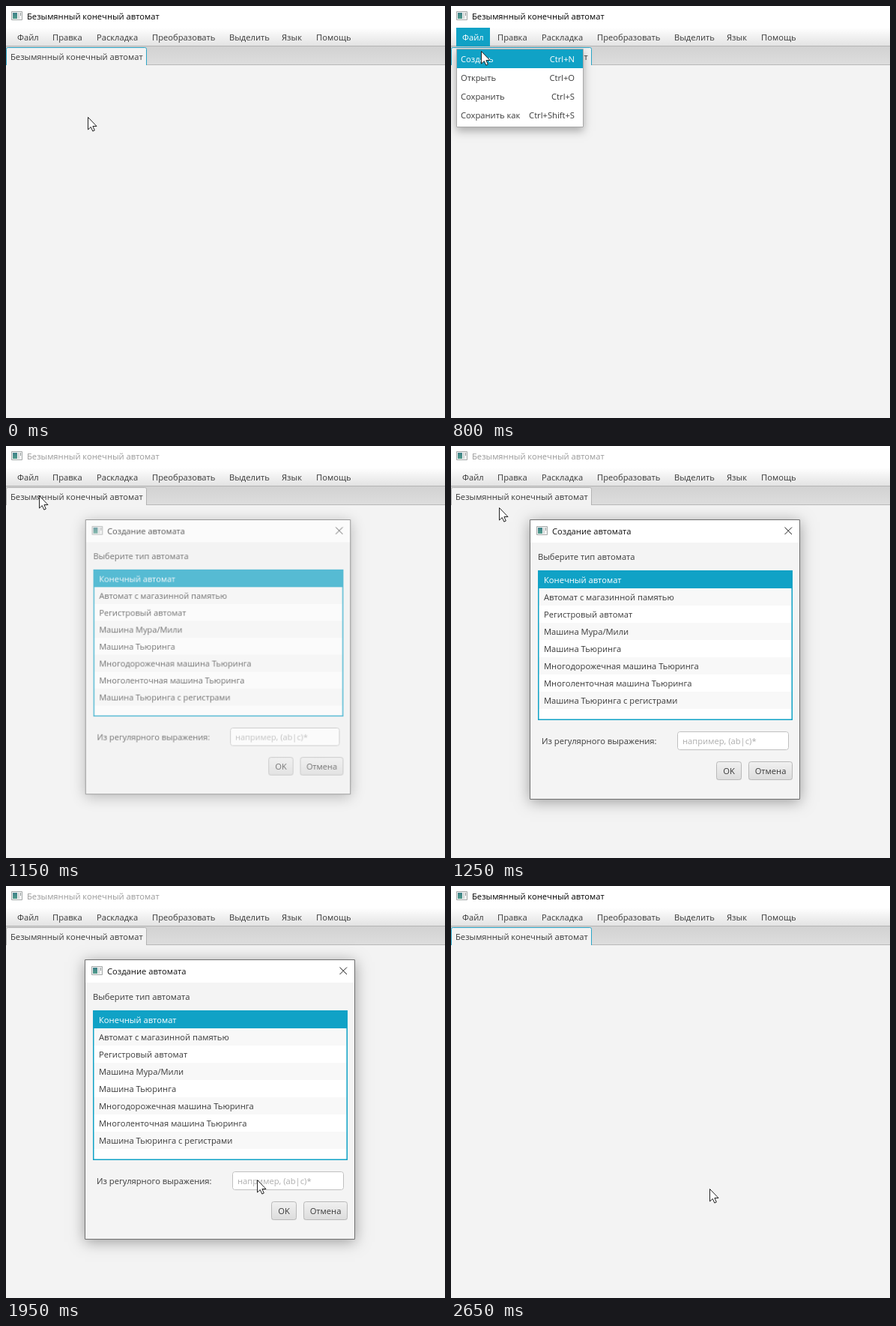
These frames come from a looping animation (586x550 px, 2700 ms). An HTML page with a canvas:

```html
<!DOCTYPE html>
<html lang="ru">
<head>
<meta charset="utf-8">
<style>
  html, body { margin: 0; width: 100%; height: 100%; overflow: hidden; background: #f3f3f3; }
  canvas { display: block; width: 586px; height: 550px; }
</style>
</head>
<body>
<canvas id="stage" width="586" height="550"></canvas>
<script>
const W = 586, H = 550, LOOP = 2700, STEP = 50;
const BLUE = '#10a2c6', INK = '#3a3a3a';
const TITLE = 'Безымянный конечный автомат';

const stage = document.getElementById('stage').getContext('2d');
const layer = document.createElement('canvas');
layer.width = W;
layer.height = H;
const dialog = layer.getContext('2d');

// Moments at which the interface switches state
const MENU_OPEN = 550, MENU_CLOSE = 1000, DIALOG_OPEN = 1100, OK_PRESS = 2250, DIALOG_CLOSE = 2350;

// Pointer stops: time, x, y
const path = [
  [0, 109, 148], [500, 31, 44], [550, 31, 44], [800, 40, 60], [1150, 44, 66],
  [1550, 205, 202], [2150, 361, 437], [2300, 361, 437], [2650, 345, 404], [2700, 345, 404]
];

const menus = [['Файл', 15], ['Правка', 62], ['Раскладка', 121], ['Преобразовать', 195],
  ['Выделить', 298], ['Язык', 368], ['Помощь', 414]];
const commands = [['Создать', 'Ctrl+N'], ['Открыть', 'Ctrl+O'],
  ['Сохранить', 'Ctrl+S'], ['Сохранить как', 'Ctrl+Shift+S']];
const machines = ['Конечный автомат', 'Автомат с магазинной памятью', 'Регистровый автомат',
  'Машина Мура/Мили', 'Машина Тьюринга', 'Многодорожечная машина Тьюринга',
  'Многоленточная машина Тьюринга', 'Машина Тьюринга с регистрами'];

function rect(c, x, y, w, h, fill) {
  c.fillStyle = fill;
  c.fillRect(x, y, w, h);
}

function frame(c, x, y, w, h, color, radius = 0, line = 1) {
  c.beginPath();
  c.roundRect(x + line / 2, y + line / 2, w - line, h - line, radius);
  c.strokeStyle = color;
  c.lineWidth = line;
  c.stroke();
}

function text(c, str, x, middle, color = INK, align = 'left') {
  c.font = '11.2px "Open Sans", "Noto Sans", sans-serif';
  c.textAlign = align;
  c.fillStyle = color;
  c.fillText(str, x, middle + 4);
}

function gradient(c, y, h, from, to) {
  const g = c.createLinearGradient(0, y, 0, y + h);
  g.addColorStop(0, from);
  g.addColorStop(1, to);
  return g;
}

function shadowed(c, x, y, w, h, fill, blur, dy, alpha) {
  c.save();
  c.shadowColor = `rgba(0,0,0,${alpha})`;
  c.shadowBlur = blur;
  c.shadowOffsetY = dy;
  rect(c, x, y, w, h, fill);
  c.restore();
}

function windowIcon(c, x, y) {
  rect(c, x, y, 15, 12, '#f4f4f4');
  frame(c, x, y, 15, 12, '#a4a9a9');
  rect(c, x + 2, y + 2, 6, 8, gradient(c, y + 2, 8, '#3d7f88', '#529d8c'));
  rect(c, x + 9, y + 2, 2, 8, '#d2d6d6');
  rect(c, x + 12, y + 2, 1, 4, '#8d9696');
}

// Monotone cubic interpolation along one axis of the pointer path
function pointerAxis(t, axis) {
  const slope = i => (path[i + 1][axis] - path[i][axis]) / (path[i + 1][0] - path[i][0]);
  const tangent = i => {
    if (i === 0 || i === path.length - 1) return 0;
    const a = slope(i - 1), b = slope(i);
    return a * b > 0 ? 2 * a * b / (a + b) : 0;
  };
  let i = 0;
  while (i < path.length - 2 && t >= path[i + 1][0]) i++;
  const span = path[i + 1][0] - path[i][0];
  const u = (t - path[i][0]) / span, v = 1 - u;
  return path[i][axis] * (1 + 2 * u) * v * v + path[i + 1][axis] * u * u * (3 - 2 * u)
    + span * u * v * (tangent(i) * v - tangent(i + 1) * u);
}

function drawPointer(x, y) {
  const c = stage;
  c.beginPath();
  [[0, 0], [0, 16.5], [3.8, 13], [6.3, 18.6], [8.8, 17.5], [6.4, 12], [11.5, 12]]
    .forEach(([dx, dy]) => c.lineTo(x + dx + 0.5, y + dy + 0.5));
  c.closePath();
  c.fillStyle = '#fff';
  c.fill();
  c.strokeStyle = '#222';
  c.lineWidth = 1;
  c.stroke();
}

function drawWindow(active, fileLit) {
  const c = stage;
  rect(c, 0, 0, W, H, '#f3f3f3');
  rect(c, 0, 0, W, 29, '#fff');
  windowIcon(c, 7, 7);
  text(c, TITLE, 28, 14, active ? '#000' : '#999');

  rect(c, 0, 54, W, 24, gradient(c, 54, 24, '#d2d2d2', '#dddddd'));
  rect(c, 0, 78, W, 1, '#b8b8b8');
  rect(c, 0, 29, W, 24, gradient(c, 29, 24, '#ffffff', '#e3e3e3'));
  rect(c, 0, 53, W, 1, '#b4b4b4');
  if (fileLit) rect(c, 7, 29, 45, 25, BLUE);
  menus.forEach(([name, x], i) => text(c, name, x, 42, fileLit && i === 0 ? '#fff' : INK));

  c.beginPath();
  c.roundRect(0.5, 55.5, 187, 26, [2, 2, 0, 0]);
  c.save();
  c.clip();
  rect(c, 0, 55, 188, 24, '#f3f3f3');
  c.restore();
  c.save();
  c.beginPath();
  c.rect(0, 54, 190, 25);
  c.clip();
  frame(c, 0, 55, 188, 28, active ? '#2ba6c8' : '#b4b4b4', 2);
  c.restore();
  text(c, TITLE, 6, 68);
}

function drawMenu(y) {
  const c = stage;
  shadowed(c, 7, 57, 170, 105, '#fff', 11, 5, 0.3);
  frame(c, 7, 57, 170, 105, '#a9a9a9');
  commands.forEach(([name, keys], i) => {
    const top = 58 + 25 * i, lit = y >= top && y < top + 25;
    if (lit) rect(c, 8, top, 168, 25, BLUE);
    const color = lit ? '#fff' : INK;
    text(c, name, 13, top + 13, color);
    text(c, keys, 165, top + 13, color, 'right');
  });
}

function button(c, label, x, w, from, to, border, line) {
  c.beginPath();
  c.roundRect(x, 421, w, 25, 3);
  c.fillStyle = gradient(c, 421, 25, from, to);
  c.fill();
  frame(c, x, 421, w, 25, border, 3, line);
  text(c, label, x + w / 2, 434, INK, 'center');
}

function drawDialog(pressed, hovered) {
  const c = dialog;
  c.clearRect(0, 0, W, H);
  shadowed(c, 105, 98, 361, 374, '#f4f4f4', 18, 3, 0.36);
  rect(c, 106, 99, 359, 30, '#fff');
  frame(c, 105, 98, 361, 374, '#707070');
  windowIcon(c, 114, 107);
  text(c, 'Создание автомата', 135, 114, '#111');
  c.beginPath();
  c.moveTo(445.5, 108.5);
  c.lineTo(455, 118);
  c.moveTo(455, 108.5);
  c.lineTo(445.5, 118);
  c.strokeStyle = '#222';
  c.lineWidth = 1;
  c.stroke();
  text(c, 'Выберите тип автомата', 116, 148);

  rect(c, 116, 166, 340, 200, '#fff');
  machines.forEach((name, i) => {
    const top = 167 + 23 * i, selected = i === 0;
    const plain = i % 2 ? '#f8f8f8' : '#fff';
    rect(c, 117, top, 338, 23, selected ? (pressed ? '#d0d0d0' : BLUE) : plain);
    text(c, name, 124, top + 12, selected && !pressed ? '#fff' : INK);
  });
  frame(c, 116, 166, 340, 200, pressed ? '#c4c4c4' : BLUE, 0, pressed ? 1 : 1.5);

  text(c, 'Из регулярного выражения:', 121, 394);
  c.beginPath();
  c.roundRect(302, 381, 149, 25, 3);
  c.fillStyle = '#fff';
  c.fill();
  frame(c, 302, 381, 149, 25, '#c0c0c0', 3);
  text(c, 'например, (ab|c)*', 309, 394, '#adadad');

  if (pressed) button(c, 'OK', 354, 34, '#dedede', '#d0d0d0', '#26a7cb', 1.6);
  else if (hovered) button(c, 'OK', 354, 34, '#fbfbfb', '#e8e8e8', '#b9b9b9', 1);
  else button(c, 'OK', 354, 34, '#f1f1f1', '#dcdcdc', '#b9b9b9', 1);
  button(c, 'Отмена', 397, 59, '#f1f1f1', '#dcdcdc', '#b9b9b9', 1);
}

// How far the dialog has faded in: 0 hidden, 1 fully shown
function dialogPresence(t) {
  if (t < DIALOG_OPEN || t >= DIALOG_CLOSE + 100) return 0;
  if (t >= DIALOG_CLOSE) return 0.7 - 0.4 * (t - DIALOG_CLOSE) / STEP;
  const u = Math.min(1, (t - DIALOG_OPEN) / 150);
  return 1 - 0.7 * Math.pow(1 - u, 2);
}

function render(t) {
  const x = Math.round(pointerAxis(t, 1)), y = Math.round(pointerAxis(t, 2));
  const menuOpen = t >= MENU_OPEN && t < MENU_CLOSE;
  const active = t < DIALOG_OPEN || t >= DIALOG_CLOSE;
  const overFile = active && x >= 7 && x < 52 && y >= 29 && y < 54;
  drawWindow(active, menuOpen || overFile);
  if (menuOpen) drawMenu(y);

  const shown = dialogPresence(t);
  if (shown > 0) {
    const overOk = x >= 354 && x < 388 && y >= 421 && y < 446;
    drawDialog(t >= OK_PRESS, overOk);
    const s = 1 - 0.058 * (1 - shown);
    stage.save();
    stage.globalAlpha = shown;
    stage.translate(105 + 40 * (1 - s), 98);
    stage.scale(s, s);
    stage.drawImage(layer, -105, -98);
    stage.restore();
  }
  drawPointer(x, y);
}

const start = performance.now();
function tick() {
  const t = (performance.now() - start) % LOOP;
  render(Math.floor(t / STEP) * STEP);
  requestAnimationFrame(tick);
}
tick();
</script>
</body>
</html>
```
